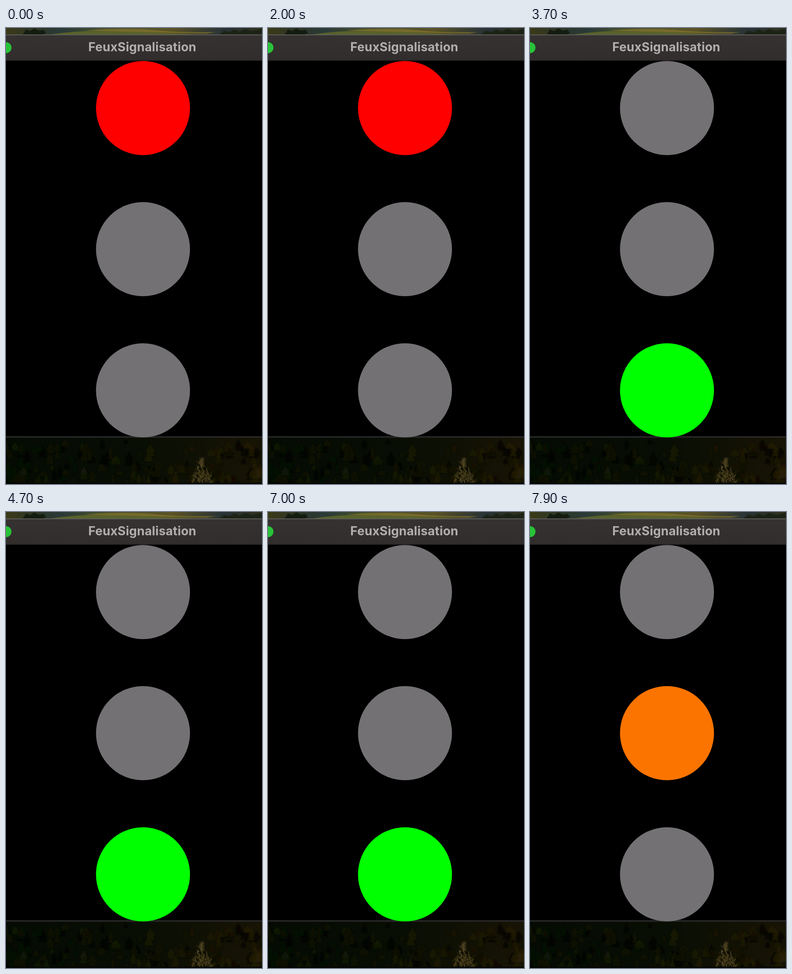
Recreate the animation shown at these times as an HTML page. Size 561x998 px, loop 8 s.

```html
<!DOCTYPE html>
<html lang="fr">
<head>
<meta charset="utf-8">
<title>FeuxSignalisation</title>
<style>
  html, body { margin: 0; width: 100%; height: 100%; overflow: hidden; background: #000; }
  svg { display: block; width: 561px; height: 998px; }
  text { font: 700 27px Inter, Roboto, sans-serif; letter-spacing: .15px; fill: #b1afae; text-anchor: middle; }
  .lamp { fill: #737174; }
</style>
</head>
<body>
<svg viewBox="0 0 561 998">
  <defs>
    <linearGradient id="meadow">
      <stop offset="0" stop-color="#3b3a18"/>
      <stop offset=".12" stop-color="#2c3628"/>
      <stop offset=".22" stop-color="#2a3a38"/>
      <stop offset=".4" stop-color="#46502a"/>
      <stop offset=".65" stop-color="#5a5226"/>
      <stop offset=".85" stop-color="#273236"/>
      <stop offset="1" stop-color="#2f301c"/>
    </linearGradient>
    <linearGradient id="forest">
      <stop offset="0" stop-color="#050b03"/>
      <stop offset=".55" stop-color="#090e04"/>
      <stop offset="1" stop-color="#181405"/>
    </linearGradient>
    <linearGradient id="bar" x2="0" y2="1">
      <stop offset="0" stop-color="#353231"/>
      <stop offset="1" stop-color="#302d2c"/>
    </linearGradient>
    <filter id="soft"><feGaussianBlur stdDeviation="1.3"/></filter>
    <filter id="fine"><feGaussianBlur stdDeviation=".7"/></filter>
  </defs>

  <!-- wallpaper above the window -->
  <rect width="561" height="15" fill="url(#meadow)"/>
  <g filter="url(#fine)">
    <path d="M90 15Q170 3 260 7T430 15Z" fill="#59622a"/>
    <path d="M170 5Q270 -1 330 5T460 9L440 12Q330 10 170 5Z" fill="#776a2c"/>
    <path d="M36 15L44 3L52 7L62 1L72 6L82 4L88 11L78 15Z" fill="#141c10"/>
    <path d="M466 15L478 6L490 9L500 3L512 8L524 2L540 7L561 1V15Z" fill="#1c2316"/>
  </g>

  <!-- wallpaper below the window -->
  <rect y="896" width="561" height="102" fill="url(#forest)"/>
  <g id="trees" filter="url(#soft)"></g>
  <g id="shrub" stroke-linecap="round" filter="url(#fine)"></g>
  <rect y="995.5" width="561" height="2.5" fill="#030302"/>

  <!-- window -->
  <rect y="14" width="561" height="59" fill="url(#bar)"/>
  <rect y="14" width="561" height="2" fill="#5c5b57"/>
  <rect y="71" width="561" height="823" fill="#000"/>
  <rect y="70.5" width="561" height="1.5" fill="#1d1b1a"/>
  <rect y="893.5" width="561" height="3" fill="#2c2b2b"/>
  <circle cx="0" cy="43" r="12" fill="#28c338"/>
  <text x="298.7" y="51">FeuxSignalisation</text>

  <circle class="lamp" cx="300.2" cy="175.2" r="103"/>
  <circle class="lamp" cx="300.2" cy="484" r="103"/>
  <circle class="lamp" cx="300.2" cy="793.1" r="103"/>
</svg>
<script>
  const LOOP = 8000, OFF = '#737174';
  const RED = '#ff0000', ORANGE = '#fb7400', GREEN = '#00ff00';
  // time in ms, then colours from top to bottom; green lasts five seconds
  const phases = [
    [0, RED, OFF, OFF],
    [2050, OFF, OFF, GREEN],
    [7050, OFF, ORANGE, OFF],
    [LOOP, OFF, ORANGE, OFF]
  ];
  document.querySelectorAll('.lamp').forEach((lamp, i) => {
    lamp.animate(
      phases.map(p => ({ offset: p[0] / LOOP, fill: p[i + 1], easing: 'step-end' })),
      { duration: LOOP, iterations: Infinity }
    );
  });

  let seed = 17;
  const rnd = (lo, hi) => {
    seed = seed * 16807 % 2147483647;
    return lo + (hi - lo) * seed / 2147483647;
  };
  const add = (id, d, attrs) => {
    const el = document.createElementNS('http://www.w3.org/2000/svg', 'path');
    el.setAttribute('d', d);
    for (const k in attrs) el.setAttribute(k, attrs[k]);
    document.getElementById(id).append(el);
  };

  // ragged patches of foliage, greener on the left and browner on the right
  for (let i = 0; i < 170; i++) {
    const x = rnd(-10, 570), y = rnd(898, 990), w = rnd(5, 13), h = rnd(8, 22);
    const warm = x / 561, k = rnd(.2, 1.5);
    add('trees', `M${x} ${y}l${w} ${h}l${-w / 2} -2l${w / 3} ${h / 2}h${-w * 1.7}l${w / 3} ${-h / 2}l${-w / 2} 2Z`, {
      fill: `rgb(${(9 + 21 * warm) * k},${(17 + 7 * warm) * k},${6 * k})`, opacity: .6
    });
  }

  for (let i = 0; i < 130; i++) {
    const y = 996 - 50 * rnd(0, 1) ** 1.4, spread = (y - 942) * .5;
    const x = 428 + rnd(-spread, spread), k = rnd(.4, 1);
    add('shrub', `M${x} ${y}l${rnd(-4, 4)} ${rnd(-7, -2)}`, {
      stroke: `rgb(${100 * k},${86 * k},${42 * k})`, 'stroke-width': 2.2, opacity: .7
    });
  }
</script>
</body>
</html>
```
